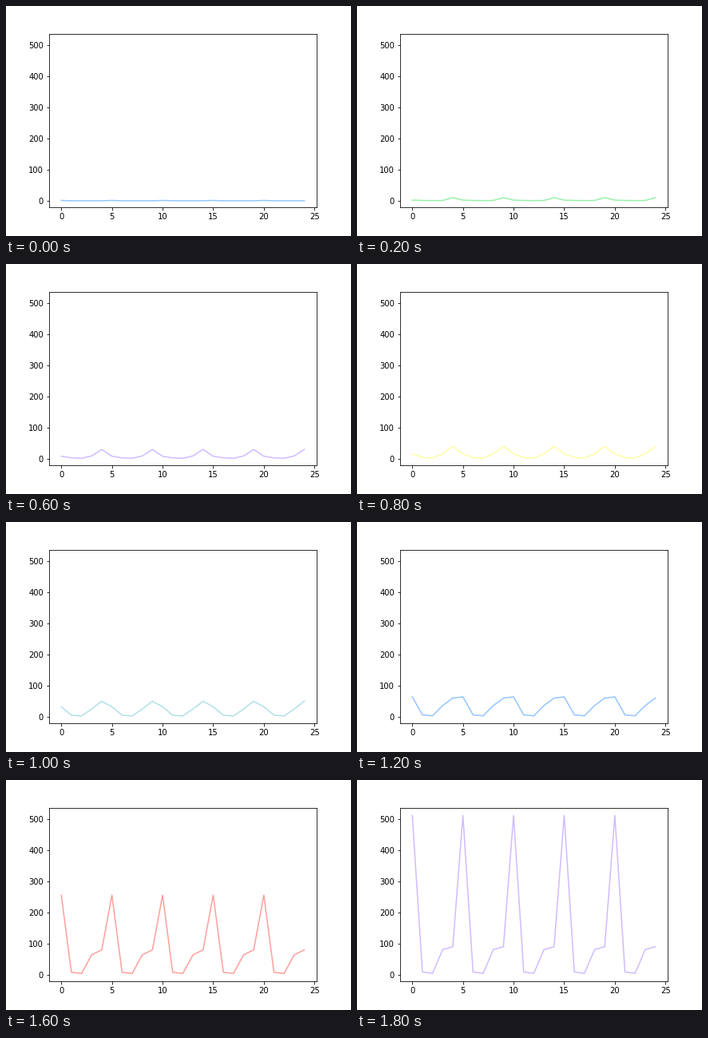
A matplotlib script for the animation above (2000 ms loop, 432 by 288 pixels).

```python
import numpy as np
import matplotlib.pyplot as plt
from matplotlib.animation import FuncAnimation

FRAMES = 10
INTERVAL = 200
REPEATS = 5
PASTEL = ["#92C6FF", "#97F0AA", "#FF9F9A", "#D0BBFF", "#FFFEA3", "#B0E0E6"]


def wave(i):
    """Five growth laws evaluated at step i, repeated along the x axis."""
    return np.tile([2 ** i, i, i / 2, i ** 2, 10 * i], REPEATS)


fig = plt.figure(figsize=(6, 4), dpi=72, facecolor="white")
fig.subplots_adjust(left=0.125, right=0.9, bottom=0.125, top=0.88)
ax = fig.add_subplot()

# The last step holds the extremes, so it fixes the axis limits.
line, = ax.plot(wave(FRAMES - 1), lw=1.5)
ax.set_xlim(ax.get_xlim())
ax.set_ylim(ax.get_ylim())


def update(i):
    line.set_ydata(wave(i))
    line.set_color(PASTEL[i % len(PASTEL)])
    return line,


anim = FuncAnimation(fig, update, frames=FRAMES, interval=INTERVAL,
                     init_func=lambda: update(0), repeat=True, repeat_delay=0)
plt.show()
```
